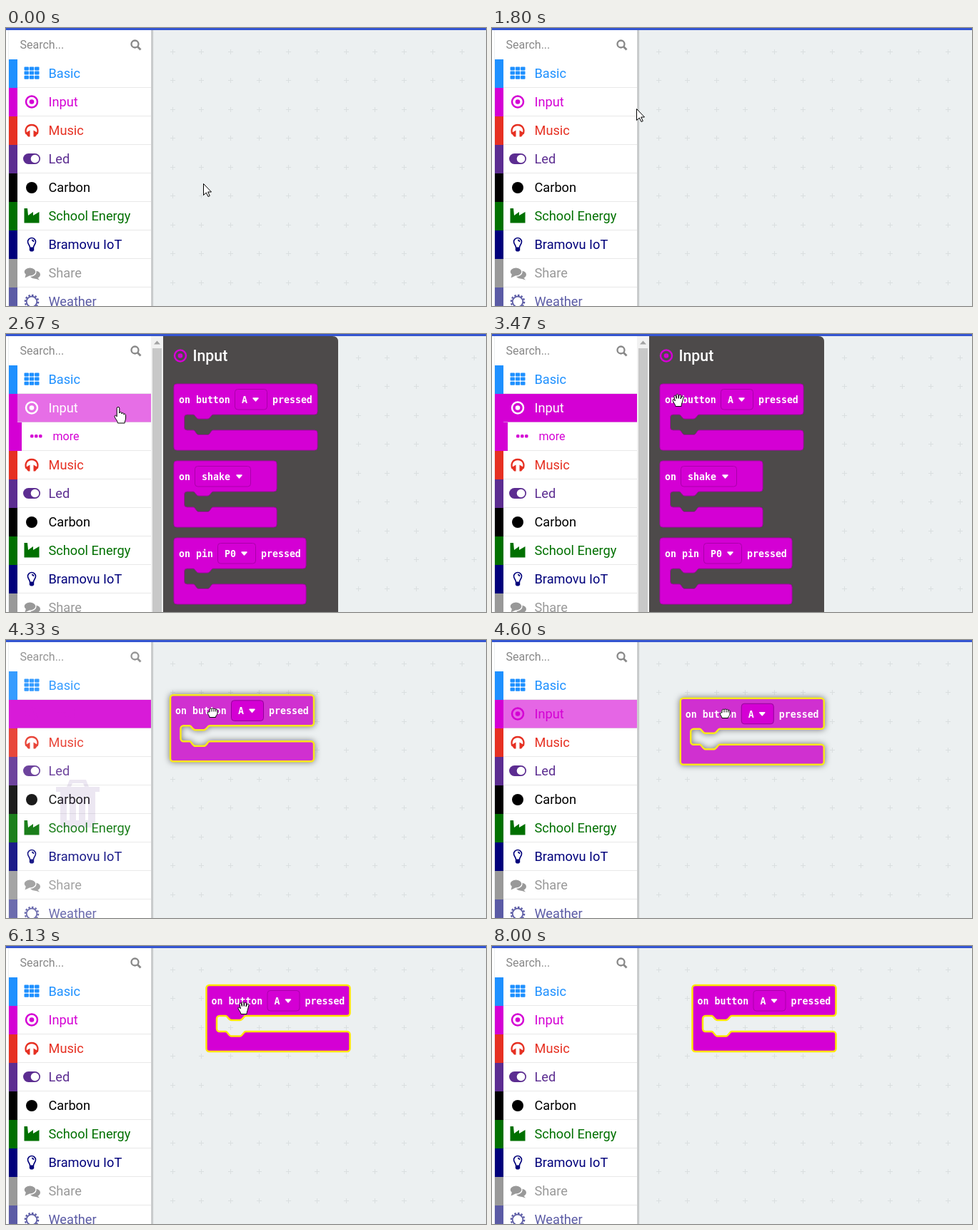
Recreate the animation shown at these times as an HTML page. Size 672 by 390 pixels, loop 8790 ms.

```html
<!DOCTYPE html>
<html lang="en">
<head>
<meta charset="utf-8">
<title>Block editor</title>
<style>
  html, body { margin: 0; width: 100%; height: 100%; overflow: hidden; background: #fff; }
  svg { display: block; width: 672px; height: 390px; font-family: Roboto, sans-serif; }
  .row { font-size: 18.2px; }
  .row text, .icon { fill: currentColor; }
  .line { fill: none; stroke: currentColor; }
  .code text { font: bold 13.25px "DejaVu Sans Mono", monospace; fill: #fff; white-space: pre; }
  .code .body { fill: #d400d4; stroke: #a900a9; }
  .code .field { fill: #d400d4; stroke: #aa00aa; }
  .placed .body { stroke: #ffe600; stroke-width: 2.5; }
  .drag { filter: drop-shadow(0 0 4px rgba(0, 0, 0, .5)); }
  .drag .body { fill: #d030d0; stroke: #f8e71c; }
  .drag .field { stroke: #94009a; }
  #cursor path { fill: #fff; stroke: #000; stroke-linejoin: round; }
</style>
</head>
<body>
<svg id="stage" viewBox="0 0 672 390"></svg>
<script>
const LOOP = 8790, TICK = 1000 / 15;
const PINK = '#d400d4';

const icons = {
  grid: [0, 1, 2].map(r => [0, 1, 2].map(c =>
    `<rect x="${-10.5 + c * 7.3}" y="${-9.5 + r * 6.1}" width="6.4" height="5" rx="1"/>`).join('')).join(''),
  target: '<circle cy="-.5" r="8" class="line" stroke-width="2.5"/><circle cy="-.5" r="3.3"/>',
  phones: '<path class="line" stroke-width="2.3" d="M-7.5 4.5C-10-1-7.5-8 0-8S10-1 7.5 4.5"/><path d="M-9 3.5-2.5-.5V8.500H-5ZM9 3.500 2.500-.5V8.500H5Z"/>',
  toggle: '<rect x="-12" y="-8" width="24" height="15" rx="7.500"/><circle cx="4.500" cy="-.5" r="5.800" fill="#fff"/>',
  dot: '<circle r="8"/>',
  factory: '<path d="M-10.500 9.500V-11H-6L-5-1 2-6V-1L10.500-6V9.500Z"/>',
  bulb: '<path class="line" stroke-width="1.600" d="M-2.500 4C-2.500 1-5.500-1-5.500-4a5.500 5.500 0 0 1 11 0C5.500-1 2.500 1 2.500 4M0-6.500c1.500 0 2.500 1 2.500 2.500"/><path d="M-3.200 3.500H3.200V8L1.500 9.500H-1.500L-3.200 8Z"/>',
  chat: '<ellipse cx="4.500" cy="2" rx="7.500" ry="5.500"/><path d="M7 5 11 9.500 3 7Z"/><ellipse cx="-2.500" cy="-2" rx="8.500" ry="6.200" stroke="#fff" stroke-width="1.400"/><path d="M-8 1-9.500 6.500-3 3.500Z"/>',
  sun: '<circle r="7.300" class="line" stroke-width="1.800"/><circle r="9.200" class="line" stroke-width="2.200" stroke-dasharray="2.600 2.180"/>'
};

const topics = [
  ['Basic', '#1e90ff', 'grid'], ['Input', PINK, 'target'], ['Music', '#e63022', 'phones'],
  ['Led', '#5c2d91', 'toggle'], ['Carbon', '#000', 'dot'], ['School Energy', '#007000', 'factory'],
  ['Bramovu IoT', '#00007b', 'bulb'], ['Share', '#999', 'chat'], ['Weather', '#5b5ba5', 'sun']
];

const row = ([name, color, icon], i) => `
  <g class="row" transform="translate(0 ${44 + i * 40})" color="${color}">
    <rect x="16" y="39" width="187" height="1" fill="#e8e8e8"/>
    ${i === 1 ? `<rect id="glow" x="16" width="187" height="39.500" fill="${PINK}"/>` : ''}
    <rect x="4" width="12" height="40" fill="${color}"/>
    <g ${i === 1 ? 'id="label"' : ''}>
      <g class="icon" transform="translate(36 20)">${icons[icon]}</g>
      <text x="59.500" y="26">${name}</text>
    </g>
  </g>`;

const blockPath = w => `M4 0H${w - 4}a4 4 0 0 1 4 4V39a4 4 0 0 1-4 4H55c-3 0-4 6-8 6H35c-4 0-5-6-8-6H18.500
  a4 4 0 0 0-4 4V61a4 4 0 0 0 4 4H27c3 0 4 6.500 8 6.500H47c4 0 5-6.500 8-6.500H${w - 4}
  a4 4 0 0 1 4 4V89a4 4 0 0 1-4 4H4a4 4 0 0 1-4-4V4a4 4 0 0 1 4-4Z`;

// fx, fw: left edge and width of the dropdown field
const block = (w, head, fx, fw, value, tail = '') => `
  <path class="body" d="${blockPath(w)}"/>
  <text x="7" y="27">${head}</text>
  <rect class="field" x="${fx + .5}" y="7.500" width="${fw - 1}" height="28.500" rx="4"/>
  <text x="${fx + 10}" y="27">${value}</text>
  <path transform="translate(${fx + fw - 16.500} 20)" d="M-3.500 0H3.500L0 4Z" fill="#fff" stroke="#fff" stroke-width="1.500" stroke-linejoin="round"/>
  <text x="${fx + fw + 7}" y="27">${tail}</text>`;

const buttonBlock = block(201, 'on button', 85, 46, 'A', 'pressed');

let crosses = '';
for (let c = 0; c < 12; c++)
  for (let r = 0; r < 9; r++)
    crosses += `M${Math.round(230 + c * 40.45)} ${Math.round(33 + r * 40.45) + .5}h7m-3.500-3.500v7`;

const shapes = {
  arrow: '<path d="M.5.5V16.500L4.300 13 7 18.500 9.300 17.500 6.700 12H11.500Z"/>',
  point: '<path d="M-1.800 2.300a1.800 1.800 0 0 1 3.600 0V9c0-2 3.200-2 3.200 0v1c0-2 3-1.600 3 .2v1c0-1.600 2.600-1.400 2.600.4V16c0 3-1.500 4-1.500 7H-.5C-.5 20-5 16-5 13.600c0-1.800 2-2 3.200.2Z"/>',
  open: '<path d="M-4 8.500C-4 6-8 2-8 .3c0-1.800 2-1.600 3.400.6L-6-5c-.5-2 1.800-2.600 2.400-.7l1 3.200-.3-4.600c0-2 2.600-2 2.700 0L.2-2.600 1-6.600c.4-1.800 2.800-1.400 2.600.5L3-2l1.600-3c.9-1.600 2.900-.6 2.400 1L5.500 2C5 4 4 6 4 8.500Z"/>',
  fist: '<path d="M-4 6.500C-4 4-7 2.500-6.500 0c.2-1.500 2-1.500 2.500-.8V-4c0-2 2.600-2.400 3-.8.4-1.800 3-1.600 3 0 .5-1.400 2.700-1 2.700.6.800-1 2.300-.4 2.300 1V1C7 3 4.500 4 4.500 6.500Z"/><path d="M-1-4.500v3M2-4.500v3M4.700-4v2.500"/>'
};

const stage = document.getElementById('stage');
stage.innerHTML = `
  <defs><linearGradient id="edge"><stop stop-color="#000" stop-opacity=".32"/><stop offset="1" stop-color="#000" stop-opacity="0"/></linearGradient></defs>
  <g id="space">
    <rect x="180" width="510" height="390" fill="#ecf0f1"/>
    <path d="${crosses}" fill="none" stroke="#dadfe0"/>
  </g>
  <g id="block" class="code">${buttonBlock}</g>
  <rect x="203" y="3" width="4" height="387" fill="url(#edge)"/>
  <rect width="203.500" height="390" fill="#fff"/>
  <rect x="3" y="3" width="1" height="387" fill="#edf0f1"/>
  <g id="toolbox">
    <text x="19.500" y="29" font-size="16" fill="#888">Search...</text>
    <g fill="none" stroke="#888" stroke-width="2.300"><circle cx="180.500" cy="22.500" r="5"/><path d="M184 26l4.500 4.500" stroke-width="2.800"/></g>
    ${topics.slice(0, 2).map(row).join('')}
    <g id="rest">${topics.slice(2).map((t, i) => row(t, i + 2)).join('')}</g>
    <g id="more" fill="${PINK}">
      <rect x="4" y="124" width="18" height="40"/>
      <rect x="34" y="141" width="4.500" height="4.500" rx="1.500"/><rect x="40" y="141" width="4.500" height="4.500" rx="1.500"/><rect x="46" y="141" width="4.500" height="4.500" rx="1.500"/>
      <text x="65.500" y="149" font-size="16">more</text>
      <rect x="22" y="163" width="181" height="1" fill="#e8e8e8"/>
    </g>
  </g>
  <g id="trash" fill="#5c2d91">
    <path d="M70 213V206H85L89 196H112L116 206H131V213ZM91 206H110L108 201H93Z" fill-rule="evenodd"/>
    <path d="M76 213H125V257Q125 263 119 263H82Q76 263 76 257ZM85 220V253H89V220ZM98 220V253H102V220ZM111 220V253H115V220Z" fill-rule="evenodd"/>
  </g>
  <g id="flyout">
    <rect x="203" y="3" width="17" height="387" fill="#f1f1f1"/>
    <path d="M207 14.500 211.500 9.500 216 14.500Z" fill="#a3a3a3"/>
    <rect x="205" y="20" width="13" height="370" fill="#c8c8c8"/>
    <path d="M220 3H457q8 0 8 8V390H220Z" fill="#4d4a4a"/>
    <g transform="translate(244 31)" color="${PINK}" class="icon">${icons.target}</g>
    <text x="261.500" y="38" font-size="21.300" font-weight="500" fill="#fff">Input</text>
    <g class="code">
      <g transform="translate(235 70)">${buttonBlock}</g>
      <g transform="translate(235 178)">${block(144, 'on', 29, 79, 'shake')}</g>
      <g transform="translate(235 286)">${block(185, 'on pin', 61, 54, 'P0', 'pressed')}</g>
    </g>
  </g>
  <rect width="672" height="3" fill="#3455d1"/>
  <g id="cursor"></g>`;

const $ = id => document.getElementById(id);
const show = (id, on) => $(id).setAttribute('visibility', on ? 'visible' : 'hidden');
const move = (id, x, y) => $(id).setAttribute('transform', `translate(${x} ${y})`);
const fade = (id, a) => $(id).setAttribute('opacity', a);

// All keys below are [tick, value...] with 15 ticks a second.
const path = [
  [16, 276, 218], [27, 202, 113], [30, 73, 100], [34, 104, 104], [40, 157, 102], [45, 215, 100],
  [50, 255, 94], [55, 271, 91], [62, 271, 91], [65, 289, 102], [69, 326, 103], [74, 344, 86],
  [77, 333.5, 76], [91, 333.5, 76], [99, 333, 160], [105, 333, 194], [107, 333, 203],
  [117, 333, 203], [119, 308, 337]
];
const glow = [[30, 0], [34, .1], [40, .57], [44, 1], [65, 1], [75, 0]];
const bin = [[62, 0], [65, 1], [67, 0]];
const modes = [[0, 'arrow'], [29, 'point'], [45, 'arrow'], [48, 'open'], [58, 'fist'], [83, 'open'], [98, 'arrow'], [120, '']];

function at(keys, k) {
  const i = keys.findIndex(p => p[0] > k);
  if (i === 0) return keys[0].slice(1);
  if (i < 0) return keys[keys.length - 1].slice(1);
  const a = keys[i - 1], b = keys[i], f = (k - a[0]) / (b[0] - a[0]);
  return a.slice(1).map((v, j) => v + (b[j + 1] - v) * f);
}

let shape = null;
function draw(k) {
  const open = k >= 34 && k < 63;
  show('flyout', open);
  show('more', open);
  move('space', open ? 17 : 0, 0);
  move('rest', 0, open ? 40 : 0);
  $('label').setAttribute('color', open ? '#fff' : PINK);
  fade('glow', at(glow, k)[0]);

  const over = at(bin, k)[0];
  fade('trash', over * .11);
  fade('toolbox', 1 - over * .11);

  // the dragged block trails the hand by one tick
  const [hx, hy] = at(path, Math.min(k - 1, 77));
  show('block', k >= 63);
  move('block', hx - 53, hy - 21);
  $('block').setAttribute('class', k < 83 ? 'code placed drag' : 'code placed');

  const mode = modes.filter(m => m[0] <= k).pop()[1];
  if (mode !== shape) $('cursor').innerHTML = shapes[shape = mode] || '';
  const [x, y] = at(path, k);
  move('cursor', Math.round(x), Math.round(y));
}

const start = performance.now();
let last = -1;
function tick() {
  const k = Math.floor(((performance.now() - start) % LOOP + 5) / TICK);
  if (k !== last) draw(last = k);
  requestAnimationFrame(tick);
}
tick();
</script>
</body>
</html>
```
